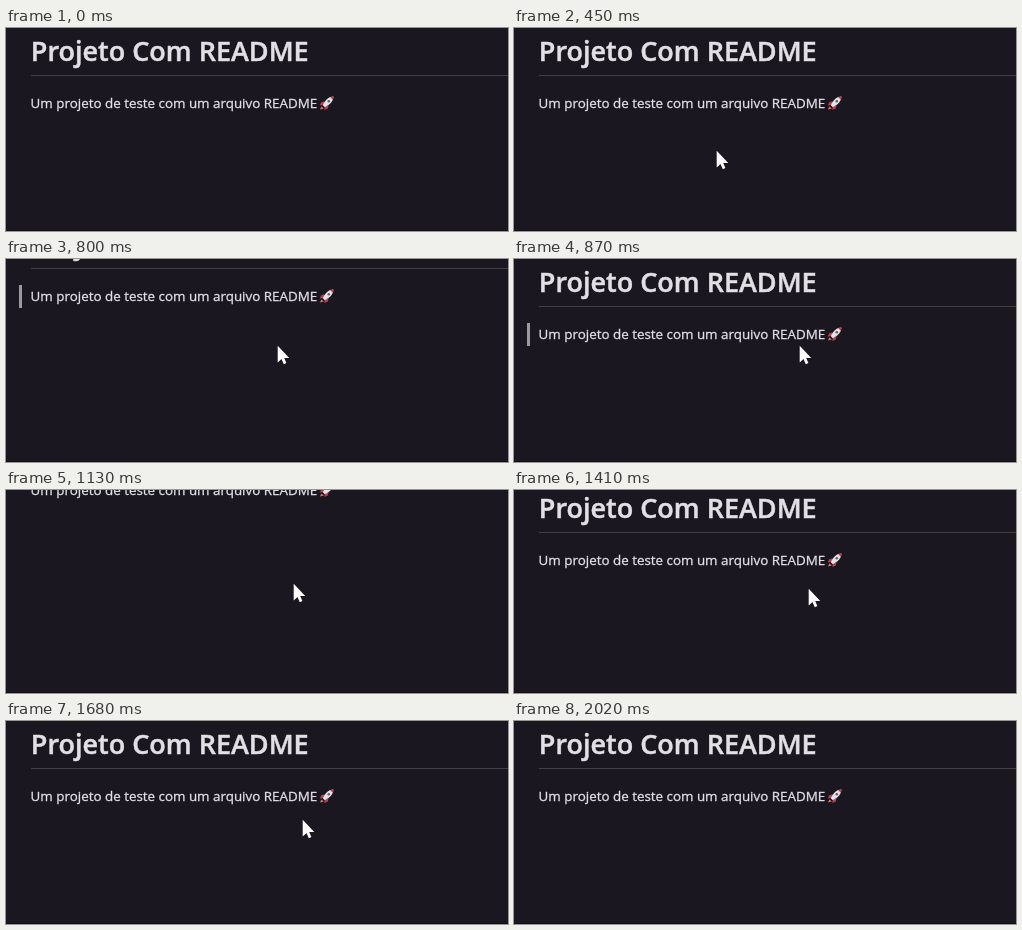
These frames come from a looping animation (502 px wide and 203 px high, 2.89 s). An HTML page:

```html
<!DOCTYPE html>
<html lang="pt">
<head>
<meta charset="utf-8">
<title>README</title>
<style>
  html, body { margin: 0; width: 100%; height: 100%; overflow: hidden; background: #1a1720; }
  svg { display: block; width: 502px; height: 203px; }
  text { font-family: "Open Sans", "Noto Sans", sans-serif; fill: #e1e0e4; stroke: #e1e0e4; }
  .title { font-size: 27px; font-weight: 600; stroke-width: .5px; }
  .body { font-size: 13.4px; stroke-width: .3px; }
</style>
</head>
<body>
<svg viewBox="0 0 502 203">
  <g id="page">
    <text class="title" x="24.8" y="32.5">Projeto Com README</text>
    <rect x="25" y="47" width="477" height="1" fill="#434047"/>
    <rect id="bar" x="13" y="64" width="3" height="23" fill="#9b999e"/>
    <text class="body" x="24.6" y="80">Um projeto de teste com um arquivo README</text>
    <g transform="translate(313 68)">
      <path d="M1 13.6 2.4 10.4 4.8 12.6Z" fill="#d9825a"/>
      <path d="M5.6 5.2 2.2 6.2.8 9.6 4.2 9ZM9.6 9.2 8.8 12.4 5.4 14 5.8 10.6Z" fill="#c23c4c"/>
      <path d="M14.4.6C10 .6 6.4 3.6 3.8 9.2L5.8 11.2C11.4 8.6 14.4 5 14.4.6Z" fill="#e4e2e6"/>
      <path d="M14.4.6 11.2 1.2 13.8 3.8Z" fill="#c23c4c"/>
      <circle cx="9.8" cy="5.2" r="1.3" fill="#5a6478"/>
    </g>
  </g>
  <rect y="202" width="502" height="1" fill="#140e15"/>
  <path id="cursor" d="M-.3-.3V16.4L3.5 12.9 5.8 18.2 8.4 17 6.2 11.9H11.2Z" fill="#fff"/>
</svg>
<script>
const LOOP = 2890, STEP = 70, SCROLL = 75, FLICK = 140;

// The picture moves in bursts and rests between them.
const bursts = [[450, 870], [1130, 1410], [1540, 1890]];
const flicks = [[450, 870], [990, 1410], [1400, 1680]];
const barSpan = [800, 1130];
const cursorEnd = 2020;

// time, x, y
const path = [
  [450, 203, 123], [590, 229, 88], [870, 286, 87],
  [1130, 288, 94], [1410, 295, 99], [1680, 297, 99], [1890, 301, 137]
];

const [page, bar, cursor] = ["page", "bar", "cursor"].map(id => document.getElementById(id));
const show = (el, on) => el.setAttribute("visibility", on ? "visible" : "hidden");
const move = (el, x, y) => el.setAttribute("transform", `translate(${x} ${y})`);
const clamp = v => Math.max(0, Math.min(1, v));

function snap(time) {
  const burst = bursts.findLast(([from]) => from <= time);
  if (!burst) return 0;
  const [from, to] = burst;
  return Math.min(to, from + Math.floor((time - from) / STEP) * STEP);
}

// Each flick scrolls down, waits and scrolls back up.
const scrollAt = t => SCROLL * Math.max(
  ...flicks.map(([from, to]) => clamp(Math.min(t - from, to - t) / FLICK))
);

function cursorAt(t) {
  const i = Math.max(1, path.findIndex(([at]) => at >= t));
  const [t0, x0, y0] = path[i - 1], [t1, x1, y1] = path[i];
  const k = clamp((t - t0) / (t1 - t0));
  return [x0 + (x1 - x0) * k, y0 + (y1 - y0) * k].map(Math.round);
}

function draw(time) {
  const t = snap(time);
  move(page, 0, -Math.round(scrollAt(t)));
  show(bar, t >= barSpan[0] && t < barSpan[1]);
  show(cursor, t > 0 && time < cursorEnd);
  move(cursor, ...cursorAt(t));
}

const start = performance.now();
function tick() {
  draw((performance.now() - start) % LOOP);
  requestAnimationFrame(tick);
}
tick();
</script>
</body>
</html>
```
